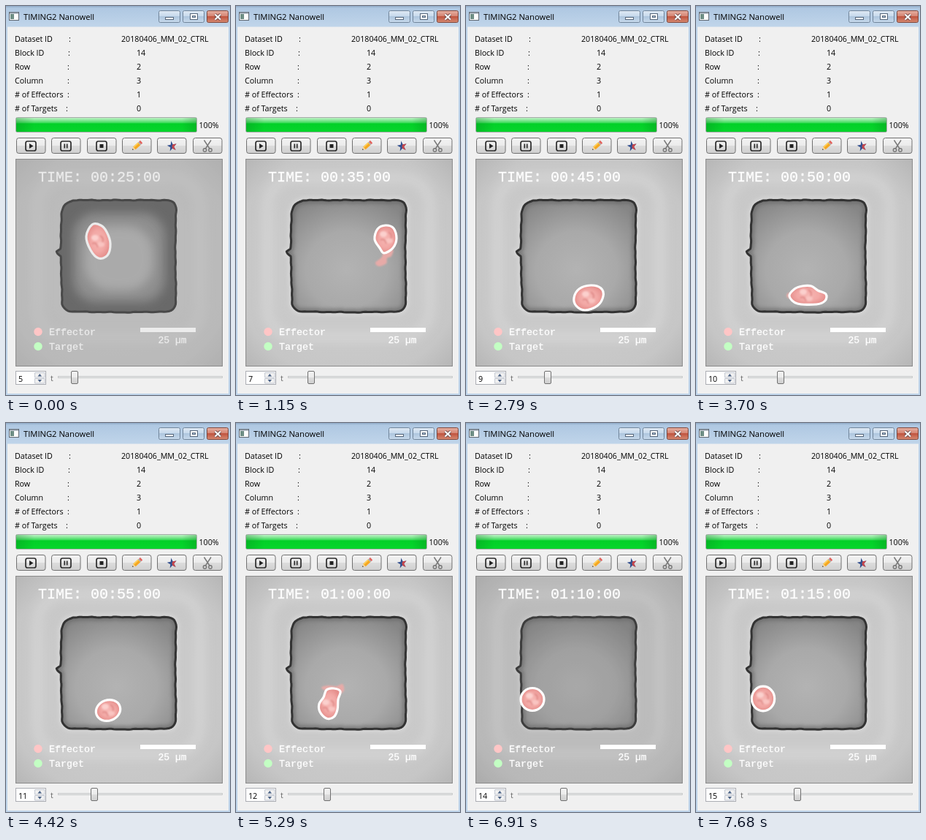
Write an HTML page that moves like this. It is 307 px wide and 532 px high and loops after 8 s.

```html
<!DOCTYPE html>
<html lang="en">
<head>
<meta charset="utf-8">
<title>Nanowell viewer</title>
<style>
  html, body { margin: 0; width: 100%; height: 100%; overflow: hidden; background: #f0f0f0; }
  svg { display: block; width: 100vw; height: 100vh; }
  text { font: 10.7px "Open Sans", "Noto Sans", sans-serif; fill: #000; white-space: pre; }
  .mono { font-family: "Liberation Mono", "DejaVu Sans Mono", monospace; font-size: 13.33px; fill: inherit; stroke: currentColor; stroke-width: .3; }
  .time { font-size: 20px; }
</style>
</head>
<body>
<svg id="stage" viewBox="0 0 307 532" xmlns="http://www.w3.org/2000/svg">
  <defs>
    <linearGradient id="bar" x2="0" y2="1"><stop stop-color="#8fa9c6"/><stop offset=".1" stop-color="#afc8e2"/><stop offset="1" stop-color="#c0d5ea"/></linearGradient>
    <linearGradient id="cap" x2="0" y2="1"><stop stop-color="#dfe9f4"/><stop offset=".5" stop-color="#c5d8eb"/><stop offset=".5" stop-color="#aec6de"/><stop offset="1" stop-color="#c8daec"/></linearGradient>
    <linearGradient id="close" x2="0" y2="1"><stop stop-color="#e5b0a2"/><stop offset=".5" stop-color="#d4816f"/><stop offset=".5" stop-color="#c0543f"/><stop offset="1" stop-color="#d58a72"/></linearGradient>
    <linearGradient id="btn" x2="0" y2="1"><stop stop-color="#f3f3f3"/><stop offset=".5" stop-color="#ebebeb"/><stop offset=".5" stop-color="#dddddd"/><stop offset="1" stop-color="#cfcfcf"/></linearGradient>
    <linearGradient id="green" x2="0" y2="1"><stop stop-color="#c6f3cc"/><stop offset=".18" stop-color="#8ae89a"/><stop offset=".36" stop-color="#3fdc5c"/><stop offset=".42" stop-color="#03d028"/><stop offset="1" stop-color="#06d62c"/></linearGradient>
    <linearGradient id="ends"><stop stop-color="#087a1a" stop-opacity=".3"/><stop offset=".1" stop-color="#087a1a" stop-opacity="0"/><stop offset=".92" stop-color="#087a1a" stop-opacity="0"/><stop offset="1" stop-color="#087a1a" stop-opacity=".3"/></linearGradient>
    <radialGradient id="field" r=".72"><stop offset=".5" stop-color="#cacaca"/><stop offset=".78" stop-color="#c6c6c6"/><stop offset="1" stop-color="#b4b4b4"/></radialGradient>
    <radialGradient id="inside" cy=".62" r=".68"><stop stop-color="#b3b3b3"/><stop offset=".5" stop-color="#a9a9a9"/><stop offset="1" stop-color="#868686"/></radialGradient>
    <radialGradient id="flesh"><stop stop-color="#f6b7b4"/><stop offset=".6" stop-color="#f2a8a5"/><stop offset="1" stop-color="#e58f8c"/></radialGradient>
    <filter id="soft1"><feGaussianBlur stdDeviation="1"/></filter>
    <filter id="edge"><feGaussianBlur stdDeviation=".7"/></filter>
    <filter id="soft2" x="-30%" y="-30%" width="160%" height="160%"><feGaussianBlur stdDeviation="2"/></filter>
    <filter id="soft7" x="-30%" y="-30%" width="160%" height="160%"><feGaussianBlur stdDeviation="7"/></filter>
    <clipPath id="view"><rect x="14" y="210" width="282" height="282"/></clipPath>
    <clipPath id="wellClip"><path class="wall"/></clipPath>
    <clipPath id="cellClip"><path class="outline"/></clipPath>
  </defs>

  <rect width="307" height="532" fill="#f0f0f0"/>
  <rect width="307" height="28.500" fill="url(#bar)"/>
  <path d="M1 28V532M306 28V532M0 531H307" stroke="#bfd4ea" stroke-width="2"/>
  <rect x="4.500" y="8.500" width="13" height="11" fill="#fff" stroke="#5d666f"/>
  <rect x="6" y="11" width="5" height="7" fill="#6f8f86"/>
  <path d="M5 9.500H17" stroke="#8b97a3" stroke-width="2"/>
  <g stroke="#71859a">
    <rect x="209.500" y="6.500" width="29" height="16" rx="2" fill="url(#cap)"/>
    <rect x="242.500" y="6.500" width="29" height="16" rx="2" fill="url(#cap)"/>
    <rect x="275.500" y="6.500" width="29" height="16" rx="2" fill="url(#close)" stroke="#80483d"/>
  </g>
  <rect x="218.500" y="15.500" width="11" height="3" fill="#fff" stroke="#56667a"/>
  <rect x="252.500" y="10.500" width="10" height="8" fill="#fff" stroke="#56667a"/>
  <rect x="255.500" y="13.500" width="4" height="2" fill="#b2c9e0" stroke="#56667a"/>
  <path d="M286.500 11.500L294 18.500M294 11.500L286.500 18.500" stroke="#6b4b4b" stroke-width="4"/>
  <path d="M286.500 11.500L294 18.500M294 11.500L286.500 18.500" stroke="#fff" stroke-width="2.200"/>
  <text x="24" y="19" style="font-size:11.2px">TIMING2 Nanowell</text>
  <g id="info"></g>

  <rect x="13.500" y="152.500" width="248" height="20" rx="2" fill="url(#green)" stroke="#a5aca7"/>
  <rect x="14" y="153" width="247" height="19" fill="url(#ends)"/>
  <text x="264.500" y="167">100%</text>

  <g id="buttons"></g>
  <g fill="none" stroke="#2b2b2b" stroke-width="1.700">
    <rect x="27" y="185" width="14" height="13" rx="2.500"/>
    <rect x="75" y="185" width="14" height="13" rx="2.500"/>
    <rect x="124" y="185" width="14" height="13" rx="2.500"/>
    <path d="M80.300 188.500V194.500M83.700 188.500V194.500"/>
  </g>
  <path d="M32 188L37.500 191.500L32 195ZM128.500 189H133.500V194H128.500Z" fill="#222"/>
  <g transform="translate(173 197) rotate(-42)">
    <path d="M0 0L4-2.500V2.500Z" fill="#f3d7a5"/><path d="M0 0L1.700-1V1Z" fill="#333"/>
    <rect x="4" y="-2.500" width="9" height="5" fill="#f6a821"/><rect x="4" y="-2.500" width="9" height="1.700" fill="#fdd05c"/>
    <rect x="13" y="-2.500" width="1.500" height="5" fill="#aaa"/><rect x="14.500" y="-2.500" width="2.500" height="5" rx="1" fill="#e2625c"/>
  </g>
  <g transform="translate(227.500 191.500) rotate(-10)">
    <path d="M0-7L1.500-2L6.500-2L2.500 1.300L4 6.300L0 3.300L-4 6.300L-2.500 1.300L-6.500-2L-1.500-2Z" fill="#34508f"/>
    <path d="M0 0L1.500-2L6.500-2L2.500 1.300L4 6.300L0 3.300Z" fill="#c9474b"/>
  </g>
  <g fill="none" stroke="#777" stroke-width="1.400">
    <path d="M271.500 183.500L279 195M281 183.500L273.500 195"/>
    <circle cx="272.500" cy="197" r="2.200"/><circle cx="280" cy="197" r="2.200"/>
  </g>

  <g clip-path="url(#view)">
    <rect x="13" y="209" width="284" height="284" fill="url(#field)"/>
    <rect x="43" y="235" width="223" height="218" rx="38" fill="none" stroke="#dedede" stroke-width="13" opacity=".5" filter="url(#soft7)"/>
    <g id="sharp">
      <path class="wall" fill="none" stroke="#e0e0e0" stroke-width="9" opacity=".5" filter="url(#soft2)"/>
      <path class="wall" fill="url(#inside)"/>
      <g clip-path="url(#wellClip)"><path class="wall" fill="none" stroke="#606060" stroke-width="10" opacity=".5" filter="url(#soft2)"/></g>
      <path class="wall" fill="none" stroke="#333" stroke-width="3" stroke-linejoin="round" filter="url(#edge)"/>
    </g>
    <g id="hazy">
      <rect x="13" y="209" width="284" height="284" fill="#a6a6a6" opacity=".42"/>
      <path class="wall" fill="#696969"/>
      <g clip-path="url(#wellClip)">
        <rect x="92" y="283" width="126" height="122" rx="32" fill="#8e8e8e" filter="url(#soft7)"/>
        <rect x="107" y="301" width="95" height="88" rx="36" fill="#aaaaaa" filter="url(#soft7)"/>
      </g>
      <path class="wall" fill="none" stroke="#484848" stroke-width="3" stroke-linejoin="round" filter="url(#edge)"/>
    </g>
    <rect id="shade" x="13" y="209" width="284" height="284" fill="#707070" opacity=".16"/>

    <path id="tail" fill="#eeaaa7" opacity=".9" filter="url(#soft1)"/>
    <g clip-path="url(#cellClip)">
      <path class="outline" fill="url(#flesh)"/>
      <g id="spots" filter="url(#soft1)">
        <ellipse cx="-4" cy="-5" rx="5" ry="4" fill="#fbd0cd"/>
        <ellipse cx="4" cy="4" rx="5" ry="3.500" fill="#f9c4c1"/>
        <path d="M-8 3Q-2 0 0 8M3-8Q9-4 6 1" fill="none" stroke="#dc8583" stroke-width="1.600"/>
      </g>
    </g>
    <g id="marks">
      <path class="outline" fill="none" stroke="currentColor" stroke-width="3.200"/>
      <text id="clock" class="mono time" x="44" y="240"></text>
      <rect x="184" y="440" width="76" height="6"/>
      <text class="mono" x="208.500" y="461" style="font-size:13px">25 µm</text>
      <text class="mono" x="59" y="450">Effector</text>
      <text class="mono" x="59" y="469.500">Target</text>
    </g>
    <circle cx="44" cy="445.500" r="5.700" fill="#ffc6c6"/>
    <circle cx="44" cy="465.500" r="5.700" fill="#c3ffc3"/>
  </g>
  <rect x="13.500" y="209.500" width="283" height="283" fill="none" stroke="#8b8b8b"/>

  <rect x="13.500" y="499.500" width="41" height="18" fill="#fff" stroke="#abadb3"/>
  <path d="M39.500 501.500H53V508H39.500ZM39.500 509.500H53V516H39.500Z" fill="#f1f1f1" stroke="#c3c8d2"/>
  <path d="M43.500 506.500L46.300 503L49 506.500ZM43.500 511L46.300 514.500L49 511Z" fill="#4a6286"/>
  <text id="step" x="17" y="514"></text>
  <text x="61" y="513" style="fill:#666">t</text>
  <rect x="71.500" y="506.500" width="225" height="2" fill="#e9eaea" stroke="#bfc1c3" stroke-width=".8"/>
  <rect id="knob" x="-4.500" y="499.500" width="9" height="17" rx="1.500" fill="url(#btn)" stroke="#707070"/>
</svg>
<script>
const $ = id => document.getElementById(id);
const setAll = (cls, d) => document.querySelectorAll("." + cls).forEach(p => p.setAttribute("d", d));
const LOOP = 8000, FIRST = 5;
const starts = [0, 430, 1150, 2040, 2790, 3700, 4420, 5290, 6030, 6910, 7680];

const rows = [
  ["Dataset ID", 86, "20180406_MM_02_CTRL", 158],
  ["Block ID", 85, "14"], ["Row", 84, "2"], ["Column", 84, "3"],
  ["# of Effectors", 84, "1"], ["# of Targets", 82, "0"]
];
$("info").innerHTML = rows.map(([label, colon, value, x = 179], i) => {
  const y = 49 + i * 19;
  return `<text x="12" y="${y}">${label}</text><text x="${colon}" y="${y}">:</text><text x="${x}" y="${y}">${value}</text>`;
}).join("");

$("buttons").innerHTML = [0, 1, 2, 3, 4, 5].map(i =>
  `<rect x="${Math.round(14 + i * 48.3) + .5}" y="180.5" width="39.5" height="21" rx="3" fill="url(#btn)" stroke="#707070"/>`
).join("");

// Slightly ragged well wall, sampled from a clean outline.
function wallPath() {
  const base = document.createElementNS("http://www.w3.org/2000/svg", "path");
  base.setAttribute("d", "M94 265.5H220Q232 266 233 277L232 340L233 402Q232 417 222 418L160 419L92 418Q78 417 77 406L75 342L69 336L75 332L76 284Q78 268 94 265.5Z");
  const len = base.getTotalLength();
  let d = "";
  for (let s = 0; s < len; s += 3) {
    const p = base.getPointAtLength(s);
    const x = p.x + .5 * Math.sin(s * .31) * Math.sin(s * .13 + 1);
    const y = p.y + .5 * Math.sin(s * .27 + 2) * Math.cos(s * .11);
    d += (d ? "L" : "M") + x.toFixed(1) + " " + y.toFixed(1);
  }
  return d + "Z";
}

// Closed Catmull-Rom curve through "x,y x,y ..." points.
function blob(points) {
  const p = points.split(" ").map(s => s.split(",").map(Number)), n = p.length;
  const at = i => p[(i + n) % n];
  const lean = (a, b, c, k) => a.map((v, j) => v + k * (c[j] - b[j]) / 6);
  return "M" + p[0] + p.map((a, i) => {
    const b = at(i + 1);
    return "C" + [lean(a, at(i - 1), b, 1), lean(b, a, at(i + 2), -1), b].join(" ");
  }).join("") + "Z";
}

function oval(cx, cy, rx, ry, deg = 0) {
  const move = `a${rx} ${ry} ${deg} 1 0 `;
  const c = Math.cos(deg * Math.PI / 180) * rx, s = Math.sin(deg * Math.PI / 180) * rx;
  return `M${cx - c} ${cy - s}${move}${2 * c} ${2 * s}${move}${-2 * c} ${-2 * s}Z`;
}

const cells = [
  { at: [126, 322], d: blob("118,299 130,300 138,309 143,325 139,341 127,345 116,334 110,315") },
  { at: [168, 314], d: oval(168, 314, 20, 12, -12) },
  { at: [206, 317], d: blob("205,300 216,304 220,318 215,331 203,338 197,331 190,319 194,305"),
    tail: blob("203,331 215,333 213,342 207,345 206,352 196,356 191,351 200,343") },
  { at: [198, 364], d: oval(198, 364, 13, 19, 20) },
  { at: [168, 399], d: blob("148,399 155,387 171,382 185,386 188,397 180,410 163,416 151,410") },
  { at: [151, 396], d: blob("128,397 135,387 146,383 158,383 167,389 178,394 177,403 165,408 139,407"),
    tail: oval(129, 396, 5, 4) },
  { at: [140, 393], d: oval(140, 393, 17, 14, -20) },
  { at: [127, 387], d: blob("124,365 134,363 143,367 140,378 139,392 134,402 124,404 115,395 114,384 120,375"),
    tail: blob("117,362 126,359 138,360 146,357 148,366 140,371 125,367") },
  { at: [107, 381], d: oval(107, 381, 18, 14, -8) },
  { at: [91, 378], d: oval(91, 378, 16, 15.5) },
  { at: [92, 377], d: oval(92, 377, 15.7, 16.8) }
];

const two = n => String(n).padStart(2, "0");
const show = (id, on) => $(id).setAttribute("visibility", on ? "visible" : "hidden");
let current = -1;

function draw(ms) {
  const i = starts.findLastIndex(s => s <= ms);
  if (i === current) return;
  current = i;
  const step = FIRST + i, minutes = step * 5, cell = cells[i];
  $("clock").textContent = `TIME: ${two(Math.floor(minutes / 60))}:${two(minutes % 60)}:00`;
  $("step").textContent = step;
  $("knob").setAttribute("transform", `translate(${Math.floor(94 + i * 4.5)} 0)`);
  setAll("outline", cell.d);
  $("tail").setAttribute("d", cell.tail || "");
  $("spots").setAttribute("transform", `translate(${cell.at})`);
  show("sharp", i > 0);
  show("hazy", i === 0);
  show("shade", i === 9);
  const ink = i ? "#ffffff" : "#ececec";
  $("marks").setAttribute("fill", ink);
  $("marks").setAttribute("color", ink);
}

setAll("wall", wallPath());
const begin = performance.now();
function tick() {
  draw((performance.now() - begin) % LOOP);
  requestAnimationFrame(tick);
}
tick();
</script>
</body>
</html>
```
